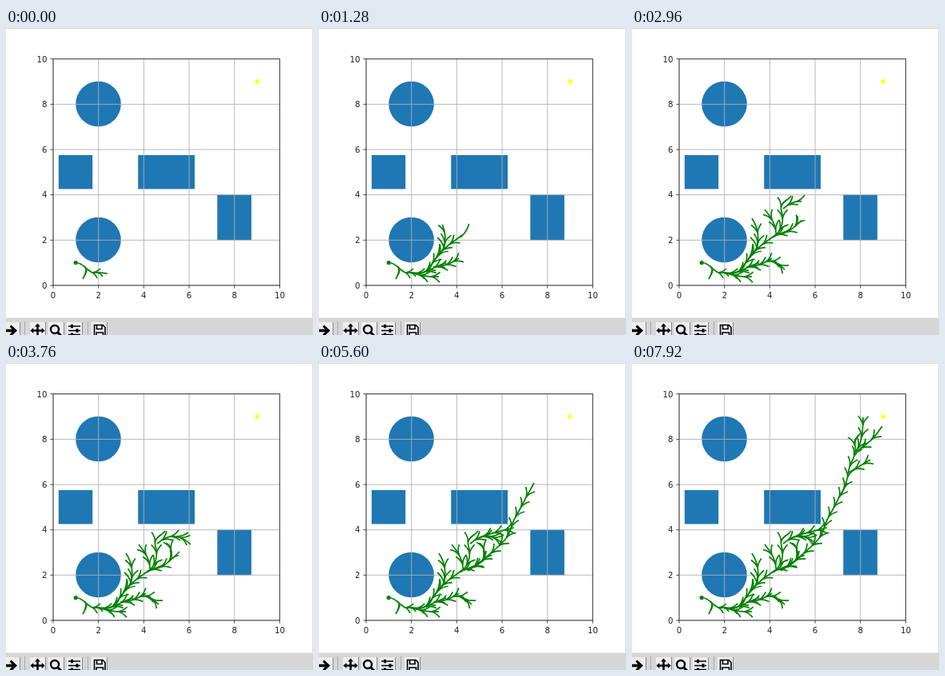
An HTML page that plays this animation: 384x384 px, repeating every 8000 ms.

```html
<!DOCTYPE html>
<html lang="en">
<head>
<meta charset="utf-8">
<title>Growing search tree</title>
<style>
html, body { margin: 0; width: 100%; height: 100%; overflow: hidden; background: #fff; }
svg { display: block; width: 100vw; height: 100vh; }
text { font: 10.2px "DejaVu Sans", sans-serif; fill: #222; }
#tree path { fill: none; stroke: #008000; stroke-width: 1.7; stroke-linejoin: round; }
#obstacles { fill: #1f77b4; }
</style>
</head>
<body>
<svg viewBox="0 0 384 384">
  <path d="M0 .5H383.5V362" fill="none" stroke="#dcdcdc"/>
  <g id="obstacles">
    <circle cx="115.5" cy="95" r="28.3"/>
    <circle cx="115.5" cy="265" r="28.3"/>
    <rect x="65.8" y="159" width="42.4" height="42.4"/>
    <rect x="165.2" y="159" width="70.8" height="42.4"/>
    <rect x="264.3" y="208.6" width="42.6" height="56.6"/>
  </g>
  <g id="axes"></g>
  <rect x="59" y="38.7" width="283.4" height="283.2" fill="none" stroke="#333" stroke-width=".9"/>
  <g id="tree"><circle cx="87.2" cy="293.6" r="2.6" fill="#008000"/></g>
  <path d="M314 63.6l.9 2.3 2.5.1-2 1.6.7 2.4-2.1-1.4-2.1 1.4.7-2.4-2-1.6 2.5-.1z" fill="#ff0" stroke="#ff0" stroke-width=".6"/>

  <g id="toolbar">
    <rect y="362.5" width="384" height="21.5" fill="#d6d6d6"/>
    <path d="M0 368h17v16H0zM30 368h19v16H30zM53 368h19v16H53zM76 368h19v16H76zM107 368h19v16h-19z" fill="#eee"/>
    <path d="M17.5 368v16M49.5 368v16M72.5 368v16M95.5 368v16M126.5 368v16" stroke="#888"/>
    <path d="M23.5 367v17M102.5 367v17" stroke="#aaa"/>
    <path d="M0 376.7H7.5L4.5 373.5 6.5 371.5 14 378.5 6.5 385.5 4.5 383.5 7.5 380.3H0z"/>
    <path d="M39.5 369.5l3.5 4h-2.2v3.7h3.9V375l4 3.5-4 3.5v-2.2h-3.9v4.2h-2.6v-4.2h-3.9v2.2l-4-3.5 4-3.5v2.2h3.9v-3.7H36z"/>
    <g fill="none" stroke="#000">
      <circle cx="61" cy="377" r="5" stroke-width="2.4"/>
      <path d="M64.5 380.5L69 385" stroke-width="3"/>
      <path d="M78 373h15M78 378.5h15M78 383.5h15" stroke-width="1.4"/>
      <path d="M82.5 370.8v4.4M89 376.3v4.4M82.5 381.5v4" stroke-width="3"/>
      <path d="M110.5 386v-14.5h10.5l3 3V386M113.5 372v4.5h6.5V372M113 386v-5h8.5v5" stroke-width="1.6"/>
    </g>
  </g>
</svg>
<script>
const STEP = 80, STEPS = 100;
const axes = document.getElementById("axes"), tree = document.getElementById("tree");

function add(parent, tag, attrs, text) {
  const el = document.createElementNS("http://www.w3.org/2000/svg", tag);
  for (const k in attrs) el.setAttribute(k, attrs[k]);
  if (text !== undefined) el.textContent = text;
  return parent.appendChild(el);
}

for (let v = 0; v <= 10; v += 2) {
  const x = 59 + 28.34 * v, y = 322 - 28.33 * v;
  add(axes, "path", { d: `M${x} 38.7V322M59 ${y}H342.4`, stroke: "#b0b0b0", "stroke-width": .9 });
  add(axes, "path", { d: `M${x} 322v3.6M59 ${y}h-3.6`, stroke: "#333", "stroke-width": .9 });
  add(axes, "text", { x, y: 338.3, "text-anchor": "middle" }, v);
  add(axes, "text", { x: 51.5, y: y + 3.8, "text-anchor": "end" }, v);
}

// Each limb: path, first step, last step, gap between its twigs
const limbs = [
  ["M87 293.5C94 293 98 299 102 302S108 307 113 306S122 307 127 307", -9, -2, 0],
  ["M98 298Q103 302 96 314", -9, -2, 0],
  ["M101 303L99 309", -9, -2, 0],
  ["M108 306Q112 308 114 313M108 306Q114 305 118 301", -9, -2, 0],
  ["M113 306Q118 306 121 311", -9, -2, 0],
  ["M113 306Q128 309 135 303S144 291 150 284L155 277", 1, 6, 13],
  ["M144 291Q151 283 151 270", 4, 7, 0],
  ["M127 307C140 304 147 296 159 294", 1, 6, 12],
  ["M118 307Q135 312 150 311", 1, 5, 14],
  ["M143 299C152 299 163 296 175 288", 8, 16, 10],
  ["M150 284C157 273 168 268 179 259", 8, 14, 12],
  ["M155 277C160 265 158 250 150 238", 10, 18, 13],
  ["M156 274Q154 267 148 262", 12, 14, 0],
  ["M179 260C188 251 190 240 187 229S192 219 199 210", 14, 23, 15],
  ["M176 262C185 256 192 256 199 251", 16, 23, 11],
  ["M180 260C181 248 175 238 166 227", 26, 33, 13],
  ["M168 292C180 290 184 296 191 302", 28, 34, 10],
  ["M186 258C200 254 209 246 207 236S202 227 200 225", 30, 40, 14],
  ["M203 249Q209 244 217 236", 36, 38, 0],
  ["M189 226C197 219 205 216 212 217S224 220 231 227", 31, 43, 12],
  ["M213 217Q221 217 228 212", 41, 44, 0],
  ["M186 260C205 248 215 238 228 226S240 203 244 196S254 178 258 170S266 156 269 150", 48, 69, 14],
  ["M199 219C212 213 226 211 244 206", 48, 55, 13],
  ["M262 164C267 153 270 145 271 135S282 115 279 104S283 94 285 88", 71, 85, 14],
  ["M271 137C280 132 290 126 298 121", 78, 84, 13],
  ["M277 114C284 106 289 98 289 68", 88, 94, 15],
  ["M278 112C289 106 303 95 313 79", 92, 98, 17]
];

const parts = [];

function twig(p, a, side, born) {
  const at = (r, turn) => `${p.x + r * Math.cos(a + side * turn)} ${p.y + r * Math.sin(a + side * turn)}`;
  const el = add(tree, "path", { d: `M${p.x} ${p.y}Q${at(6, .15)} ${at(13, .52)}` });
  parts.push(n => { el.style.display = n >= born ? "" : "none"; });
}

for (const [d, from, to, gap] of limbs) {
  const el = add(tree, "path", { d }), len = el.getTotalLength();
  parts.push(n => {
    const grown = Math.min(1, (n - from + 1) / (to - from + 1));
    el.style.display = grown > 0 ? "" : "none";
    el.style.strokeDasharray = grown < 1 ? `${grown * len} ${len}` : "none";
  });
  if (!gap) continue;
  for (let s = gap * .6; s < len - 8; s += gap) {
    const p = el.getPointAtLength(s), q = el.getPointAtLength(s + 1);
    const a = Math.atan2(q.y - p.y, q.x - p.x);
    const born = Math.min(to, Math.ceil(from + (to - from) * s / len) + 1);
    twig(p, a, -1, born);
    twig(p, a, 1, Math.min(to, born + 1));
  }
}

let start, shown = -1;
function frame(now) {
  start ??= now;
  const n = Math.floor((now - start) / STEP) % STEPS;
  if (n !== shown) {
    parts.forEach(show => show(n));
    shown = n;
  }
  requestAnimationFrame(frame);
}
parts.forEach(show => show(0));
requestAnimationFrame(frame);
</script>
</body>
</html>
```
